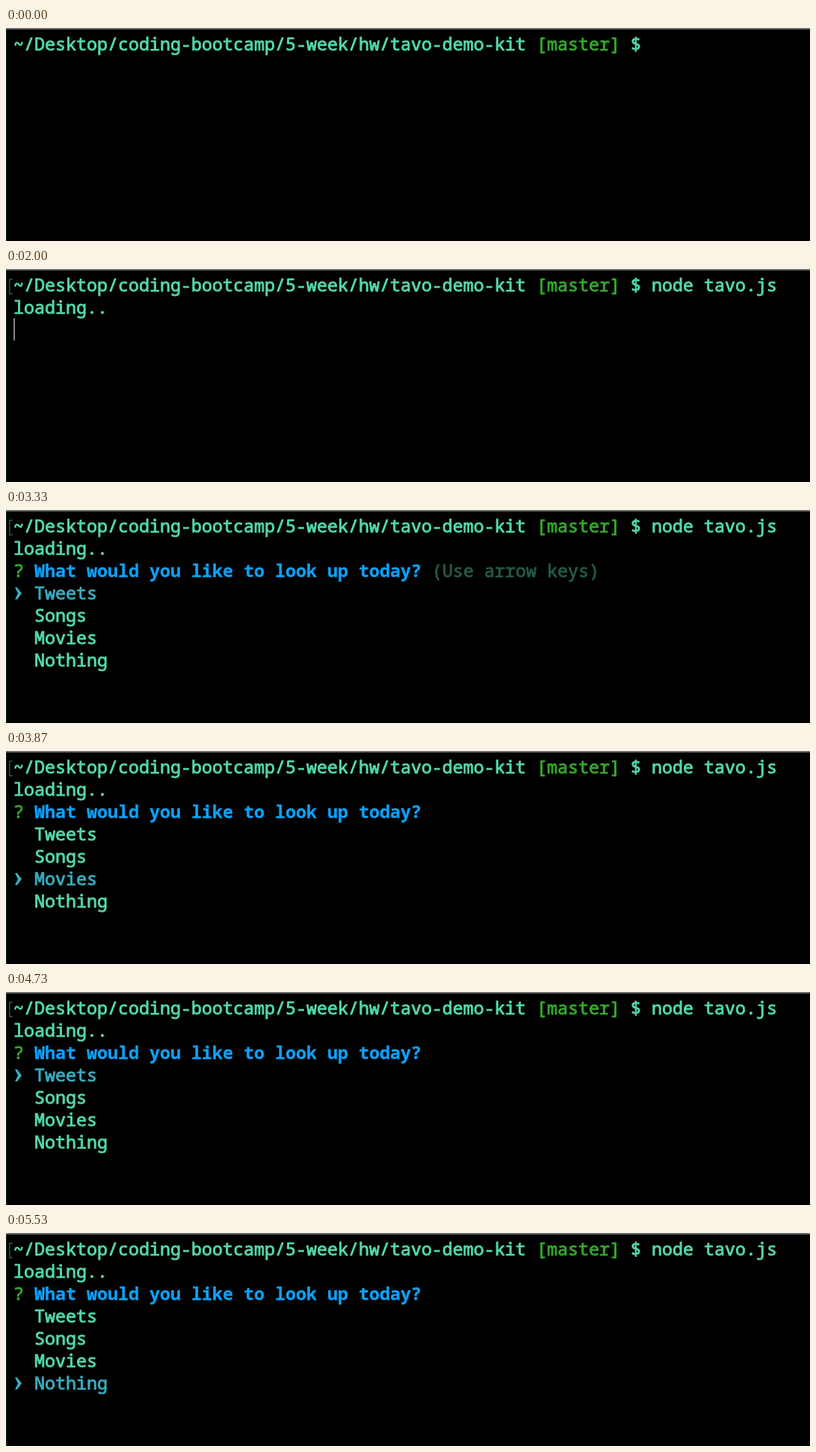
Write an HTML page with a canvas that moves like this. It is 1076x286 px and loops after 5590 ms.

```html
<!DOCTYPE html>
<html lang="en">
<head>
<meta charset="utf-8">
<title>Terminal menu</title>
<style>
html, body { margin: 0; width: 100%; height: 100%; overflow: hidden; background: #000; }
canvas { display: block; }
</style>
</head>
<body>
<canvas width="1076" height="286"></canvas>
<script>
const LOOP = 5590, LEFT = 10, TOP = 6, COL = 14, ROW = 30;
const MINT = '#53d9ab', GREEN = '#36a82b', BLUE = '#0aa2fa', CYAN = '#38adc0', DIM = '#24584a';
const PROMPT = '~/Desktop/coding-bootcamp/5-week/hw/tavo-demo-kit';
const COMMAND = 'node tavo.js ';
const ITEMS = ['Tweets', 'Songs', 'Movies', 'Nothing'];

// Times in ms
const CURSOR_ON = 270, TYPE_FROM = 640, KEY = 31, ENTER = 1400, LOADED = 1930, MENU = 2530;
// [time, selected item]; -1 while the menu is being redrawn
const PICKS = [[MENU, 0], [3530, 1], [3800, 2], [4000, 3], [4200, -1], [4270, 0], [4870, 1], [5070, 2], [5270, 3]];
const HINT_OFF = PICKS[1][0];

const ctx = document.querySelector('canvas').getContext('2d');

function rect(x, y, w, h, color) {
  ctx.fillStyle = color;
  ctx.fillRect(x, y, w, h);
}

// A thin outline gives the text its medium weight
function write(text, col, row, color, weight = 400) {
  const x = LEFT + col * COL, y = TOP + row * ROW + 24;
  ctx.font = `${weight} 23.33px "Noto Sans Mono", "DejaVu Sans Mono", monospace`;
  ctx.fillStyle = ctx.strokeStyle = color;
  ctx.lineWidth = weight > 400 ? 0.3 : 0.9;
  ctx.lineJoin = 'round';
  ctx.fillText(text, x, y);
  ctx.strokeText(text, x, y);
}

function cursor(col, row) {
  rect(LEFT + col * COL, TOP + row * ROW, 2, ROW, '#858585');
}

function pointer(row) {
  const y = TOP + row * ROW + 16;
  ctx.fillStyle = CYAN;
  ctx.beginPath();
  for (const [x, dy] of [[12, -8], [15, -8], [21, 0], [15, 8], [12, 8], [16, 0]]) ctx.lineTo(x, y + dy);
  ctx.fill();
}

function promptMark() {
  rect(4, 13, 1.5, 21, DIM);
  rect(4, 13, 5, 1.5, DIM);
  rect(4, 32.5, 5, 1.5, DIM);
}

function menu(t) {
  const pick = PICKS.findLast(([at]) => t >= at)[1];
  if (pick < 0) return;
  write('?', 0, 2, GREEN);
  write('What would you like to look up today?', 2, 2, BLUE, 700);
  if (t < HINT_OFF) write('(Use arrow keys)', 40, 2, DIM);
  ITEMS.forEach((item, i) => write(item, 2, 3 + i, i === pick ? CYAN : MINT));
  pointer(3 + pick);
}

function draw(t) {
  rect(0, 0, 1076, 286, '#000');
  rect(0, 0, 1076, 2, '#686868');
  rect(0, 2, 1, 284, '#1b2926');

  const typed = Math.max(0, Math.min(COMMAND.length, Math.ceil((t - TYPE_FROM) / KEY)));
  write(PROMPT, 0, 0, MINT);
  write('[master]', 50, 0, GREEN);
  write('$ ' + COMMAND.slice(0, typed), 59, 0, MINT);

  if (t >= ENTER) promptMark();
  if (t >= LOADED) write('loading..', 0, 1, MINT);
  if (t >= MENU) menu(t);
  else if (t >= LOADED) cursor(0, 2);
  else if (t >= ENTER) cursor(0, 1);
  else if (t >= CURSOR_ON) cursor(61 + typed, 0);
}

const start = performance.now();
function frame() {
  draw((performance.now() - start) % LOOP);
  requestAnimationFrame(frame);
}
frame();
</script>
</body>
</html>
```
